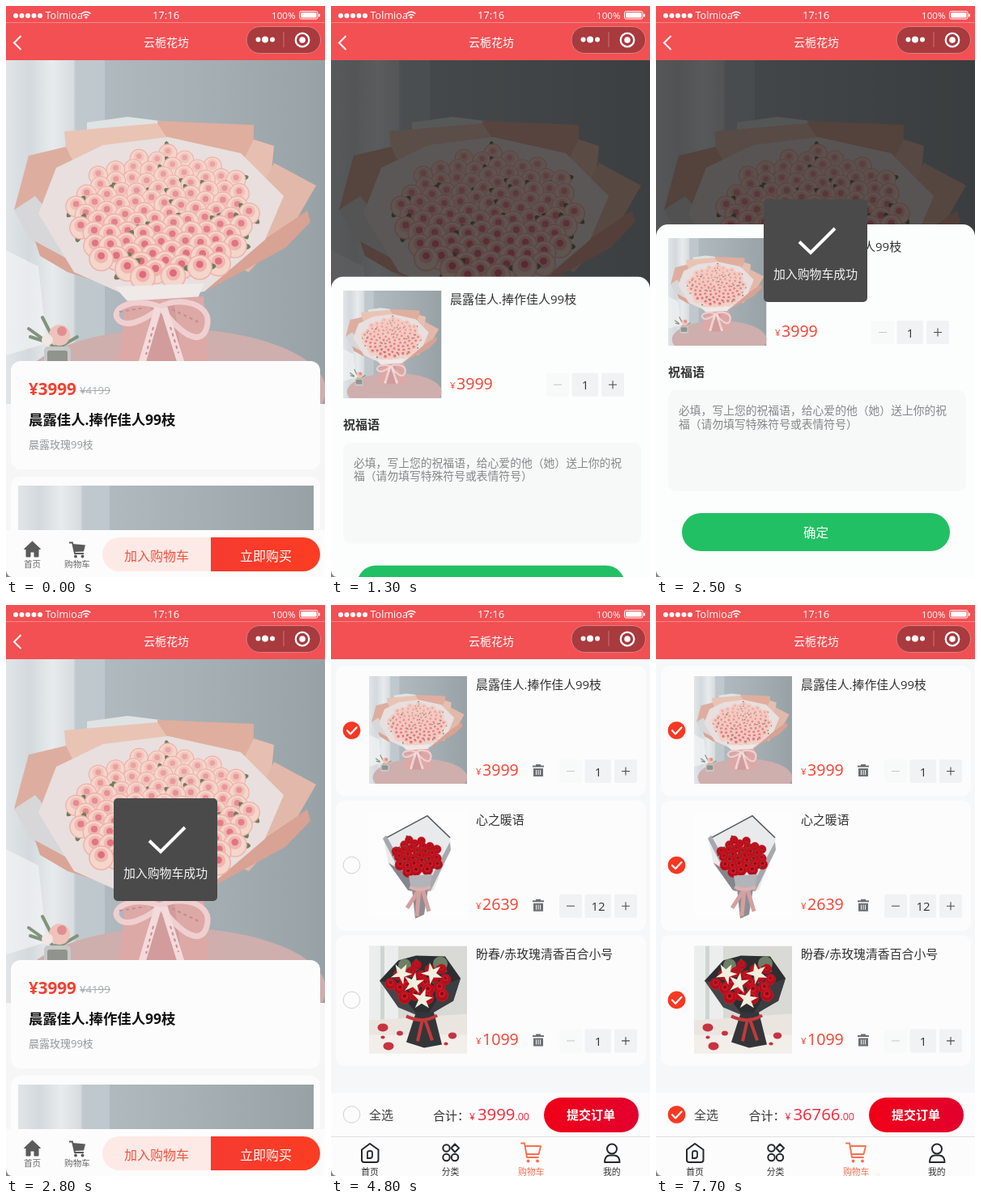
These frames come from a looping animation (394x706 px, 8 s). An HTML page:

```html
<!DOCTYPE html>
<html lang="zh-CN">
<head>
<meta charset="utf-8">
<title>花店</title>
<style>
html, body { margin: 0; width: 100%; height: 100%; overflow: hidden; background: #f6f6f6; }
svg { display: block; width: 100%; height: 100%; }
text { font-family: 'Open Sans', 'Noto Sans CJK SC', 'Noto Sans CJK', sans-serif; white-space: pre; }
</style>
</head>
<body>
<svg id="stage" viewBox="0 0 394 706" preserveAspectRatio="none"></svg>
<script>
const LOOP = 8000;
const RED = '#f6402f';
const PINK_NAME = '晨露佳人.捧作佳人99枝';

// ---- markup helpers
const text = (x, y, size, str, fill, extra = '') =>
  `<text x="${x}" y="${y}" font-size="${size}" fill="${fill}" ${extra}>${str}</text>`;
const mid = (x, y, size, str, fill, extra = '') =>
  text(x, y, size, str, fill, 'text-anchor="middle" ' + extra);
const rect = (x, y, w, h, fill, r = 0, extra = '') =>
  `<rect x="${x}" y="${y}" width="${w}" height="${h}" rx="${r}" fill="${fill}" ${extra}/>`;
const dot = (x, y, r, fill, extra = '') =>
  `<circle cx="${x}" cy="${y}" r="${r}" fill="${fill}" ${extra}/>`;
const poly = (points, fill, extra = '') => `<polygon points="${points}" fill="${fill}" ${extra}/>`;
const line = (d, stroke, w = 1, extra = '') =>
  `<path d="${d}" fill="none" stroke="${stroke}" stroke-width="${w}" ${extra}/>`;
const group = (id, body, extra = '') => `<g id="${id}" ${extra}>${body}</g>`;
const photo = (name, x, y, w, h) => `<use href="#${name}" x="${x}" y="${y}" width="${w}" height="${h}"/>`;
const round = 'stroke-linecap="round" stroke-linejoin="round"';

function random(seed) {
  return () => (seed = (seed * 16807) % 2147483647) / 2147483647;
}

// Spiral of blooms filling an ellipse, painted from back to front
function blooms(n, cx, cy, rx, ry, size, [petal, inner, core, leaf]) {
  const rnd = random(n * 31);
  const spots = Array.from({ length: n }, (_, i) => {
    const r = Math.sqrt((i + 0.5) / n), a = i * 2.39996;
    return [cx + rx * r * Math.cos(a), cy + ry * r * Math.sin(a)];
  }).sort((a, b) => a[1] - b[1]);
  return spots.map(([x, y], i) => {
    const near = i / n, s = size * (0.82 + 0.3 * near), px = x.toFixed(1), py = y.toFixed(1);
    const green = rnd() < 0.3
      ? `<ellipse cx="${px}" cy="${py}" rx="${(s * 1.35).toFixed(1)}" ry="${(s * 0.4).toFixed(1)}" fill="${leaf}" transform="rotate(${Math.round(rnd() * 180)} ${px} ${py})"/>` : '';
    return green + dot(px, py, s.toFixed(1), petal, `stroke="${inner}" stroke-width="${(s * 0.1).toFixed(2)}"`) +
      dot(px, (y - s * 0.2).toFixed(1), (s * 0.58).toFixed(1), inner, `opacity="${(0.45 + 0.45 * near).toFixed(2)}"`) +
      dot(px, (y - s * 0.25).toFixed(1), (s * 0.3).toFixed(1), core, `opacity="${(0.3 + 0.6 * near).toFixed(2)}"`);
  }).join('');
}

// ---- photos
const pinkTones = ['#f4d6cb', '#f0b0aa', '#db6175', '#6f7d5c'];
const redTones = ['#b30d1b', '#d0202b', '#7d0712', '#4a5a3c'];

const pinkPhoto = `<symbol id="pink" viewBox="0 0 394 433" preserveAspectRatio="none">` +
  rect(0, 0, 394, 433, 'url(#wall)') + rect(0, 0, 86, 433, 'url(#curtain)') +
  rect(84, 0, 38, 433, '#c3cdd2', 0, 'opacity=".75"') +
  poly('0,235 40,255 50,350 0,365', '#f3f4f5', 'opacity=".7"') +
  '<ellipse cx="205" cy="408" rx="190" ry="76" fill="#cfaeae"/>' +
  poly('100,77 150,70 190,75 188,120 100,120', '#dfe3e4') +
  poly('187,75 306,80 305,150 190,150', '#dfae9e') +
  poly('72,88 187,78 205,105 190,150 78,150', '#e9c4b5') +
  poly('306,98 331,106 322,200 270,170', '#e6bfb1') +
  poly('28,118 74,107 100,160 70,215 10,185', '#ddae9f') +
  poly('331,127 383,155 360,195 300,262 270,250', '#e2b8aa') +
  poly('372,186 376,200 345,232 250,284 265,258', '#d8a294') +
  poly('10,185 36,168 85,225 160,290 84,262 30,222', '#d7d6d8') +
  poly('36,224 84,250 150,286 76,262 42,242', '#d9a596') +
  poly('62,133 120,105 200,95 290,115 343,168 320,222 245,286 165,298 84,262 40,190', '#e8dfde') +
  blooms(96, 194, 192, 110, 79, 13.5, pinkTones) +
  poly('134,280 245,276 236,296 195,306 150,298', '#efe9e8') +
  poly('147,298 244,292 250,376 140,376', '#dca9a6') +
  poly('180,302 208,302 218,376 170,376', '#cb9596', 'opacity=".6"') +
  line('M190 305 C160 292 128 306 138 320 S178 318 190 305 C212 292 252 300 249 325 S226 352 190 305', '#f0cfd0', 7) +
  line('M188 306 L168 374 M195 306 L216 374', '#f3dadb', 9) +
  line('M140 311 L172 306 M205 308 L240 325 M182 330 L173 364 M203 330 L213 362', '#c98a92', 2, 'stroke-dasharray="4 4"') +
  line('M60 355 L28 332 M64 355 L45 318 M66 355 L88 342 M55 350 L30 342', '#81947c', 4, round) +
  dot(66, 340, 13, '#efc2ba') + dot(69, 335, 6, '#df8f92') + dot(51, 346, 7, '#f1e6e2') +
  rect(47, 354, 33, 30, '#c7c8c8', 5) + rect(51, 359, 25, 18, '#8f958c', 3) + '</symbol>';

const redPhoto = `<symbol id="red" viewBox="0 0 121 133" preserveAspectRatio="none">` +
  rect(0, 0, 121, 133, '#fdfdfd') +
  poly('18,35 72,5 101,32 98,50 80,98 50,98 24,66', '#e9eaec') +
  line('M18 35 L72 6 L100 33', '#55575b', 1.5) +
  poly('17,34 21,30 50,82 78,80 100,38 101,48 76,99 50,99', '#a6a8ad') +
  poly('24,64 50,80 54,98 48,98', '#83868c') +
  blooms(30, 59, 56, 29, 22, 6, redTones) +
  poly('49,80 78,78 75,96 52,97', '#b2b4b9') +
  poly('53,96 73,96 68,128 57,133', '#8d8e92') +
  line('M62 97 L47 120 M66 97 L74 124 M62 97 L59 130', '#d3a09f', 5) +
  line('M50 94 Q62 100 76 94', '#dcb0ad', 4) + '</symbol>';

const lilyPhoto = `<symbol id="lily" viewBox="0 0 121 133" preserveAspectRatio="none">` +
  rect(0, 0, 121, 133, '#d9d9d6') + rect(0, 0, 36, 95, '#eceeed') + rect(14, 0, 5, 95, '#cfd6d2') +
  poly('0,92 121,84 121,133 0,133', '#ebe5e0') + rect(0, 110, 121, 23, '#f2eeea') +
  poly('13,43 36,18 58,12 94,13 113,40 104,68 70,88 38,76', '#2d2e31') +
  poly('13,43 30,47 60,86 36,76', '#44464a') + poly('113,40 96,47 72,86 104,68', '#3b3d40') +
  dot(88, 22, 9, '#6d7f66') + dot(44, 24, 8, '#6d7f66') +
  blooms(19, 63, 46, 38, 25, 7, redTones) +
  [[55, 46, 10], [78, 34, 50], [66, 66, 80], [40, 34, 30]].map(([x, y, a]) =>
    `<path transform="translate(${x} ${y}) rotate(${a})" d="M0 -13 L3 -4 L12 -6 L5 2 L9 11 L0 5 L-9 11 L-5 2 L-12 -6 L-3 -4Z" fill="#f1efdd"/>`).join('') +
  poly('58,82 80,82 90,122 68,126 46,119', '#343538') +
  line('M46 87 Q67 97 84 86 M66 91 L60 118 M69 91 L78 117', '#c2393c', 4) +
  [[17, 101, 5], [24, 124, 5], [38, 108, 3], [103, 111, 4], [17, 113, 2], [95, 121, 2]]
    .map(([x, y, r]) => `<ellipse cx="${x}" cy="${y}" rx="${r * 1.3}" ry="${r}" fill="#c63440"/>`).join('') + '</symbol>';

const grad = (id, stops, extra = '') => `<linearGradient id="${id}" ${extra}>` +
  stops.map((c, i) => `<stop offset="${i / (stops.length - 1)}" stop-color="${c}"/>`).join('') + '</linearGradient>';
const defs = '<defs>' + grad('wall', ['#b9c3c8', '#a9b3b8', '#98a2a6']) +
  grad('curtain', ['#e1e5e8', '#d3d9dd', '#e8ebed', '#d5dade']) +
  grad('buy', ['#f63a30', '#fb3d22']) + grad('submit', ['#f00018', '#e2002d']) +
  pinkPhoto + redPhoto + lilyPhoto + '</defs>';

// ---- shared widgets
const price = (x, y, n) => text(x, y - 1, 11.5, '¥', RED) + text(x + 8, y, 19.6, n, RED);

function stepper(x, y, n) {
  const off = n < 2, cy = y + 14.5;
  return rect(x, y, 28, 29, off ? '#f8f9f9' : '#f1f2f3', 2) + rect(x + 31.5, y, 32.5, 29, '#f1f2f3', 2) +
    rect(x + 68, y, 28, 29, '#f1f2f3', 2) +
    line(`M${x + 9} ${cy}h10`, off ? '#c8c9cc' : '#55575a', 1.1) +
    line(`M${x + 77} ${cy}h10m-5 -5v10`, '#4a4c4f', 1.1) + mid(x + 48, y + 20.5, 15, n, '#333');
}

const tick = (id, y) => dot(25.5, y, 10.3, '#fcfcfd', 'stroke="#cfd1d4"') +
  group(id, dot(25.5, y, 10.8, '#f73822') + line(`M20 ${y + 0.2}l4 4.2l7.5 -8`, '#fff', 2.2, round));

// ---- shop page
const shop = rect(0, 67, 394, 639, '#f6f6f6') + photo('pink', 0, 67, 394, 433) + rect(0, 492, 394, 214, '#f6f6f6') +
  rect(6, 439, 382, 134, '#fcfcfc', 12) +
  text(28, 481, 20.6, '¥3999', RED, 'font-weight="700"') +
  text(91, 480, 13.2, '¥4199', '#a9abad') + line('M91 475.5H129', '#a9abad') +
  text(28, 517.5, 17.4, PINK_NAME, '#111', 'font-weight="700"') +
  text(28, 547, 13, '晨露玫瑰99枝', '#97999b') +
  rect(6, 582, 382, 140, '#fcfcfc', 12) + photo('pink', 15, 593, 365, 401) +
  rect(0, 648, 394, 58, '#fcfcfc') +
  '<path d="M32.5 662L42.5 671.5H40V681H35V675H30V681H25V671.5H22.5Z" fill="#5b5b5b" stroke="#5b5b5b" stroke-linejoin="round"/>' +
  line('M78 663.5H82L85 677H96', '#5b5b5b', 1.8) + poly('82,665 98,666.5 96,674.5 84.5,675', '#5b5b5b') +
  dot(86, 680.5, 1.9, '#5b5b5b') + dot(94.5, 680.5, 1.9, '#5b5b5b') +
  mid(32.5, 694, 10.6, '首页', '#666') + mid(88, 694, 10.6, '购物车', '#666') +
  '<path d="M253.500 657H140A21 21 0 0 0 140 699H253.500Z" fill="#fdeae6"/>' +
  '<path d="M253 657H367A21 21 0 0 1 367 699H253Z" fill="url(#buy)"/>' +
  mid(186, 685.5, 16, '加入购物车', '#f2523f') + mid(321, 685.5, 16, '立即购买', '#fff', 'font-weight="500"');

// ---- bottom sheet, laid out in its open position
const sheet = rect(0, 270, 394, 460, '#fcfdfd', 15) + photo('pink', 15, 287, 121.500, 133) +
  text(147, 303, 15, PINK_NAME, '#333') + price(147, 409, '3999') + stepper(266, 389, 1) +
  text(15, 458, 15, '祝福语', '#333', 'font-weight="700"') + rect(15, 475, 368, 125, '#f7f9f9', 10) +
  text(28, 505, 13.8, '必填，写上您的祝福语，给心爱的他（她）送上你的祝', '#858788') +
  text(28, 521.5, 13.8, '福（请勿填写特殊符号或表情符号）', '#858788') +
  rect(32, 627, 331, 47, '#22c064', 23.5, 'id="ok"') + mid(197.500, 656.5, 15.5, '确定', '#fff');

// ---- cart page
const goods = [
  ['pink', PINK_NAME, '3999', 1],
  ['red', '心之暖语', '2639', 12],
  ['lily', '盼春/赤玫瑰清香百合小号', '1099', 1]
];
const bin = '<path d="M249 198.500H253V197H259V198.500H263V200.500H249ZM250 202H262V212H250Z" fill="#6d7073"/>' +
  line('M253.500 204v6M256 204v6M258.500 204v6', '#fff', 0.9);
const item = ([pic, name, cost, n], i) => group('item' + i,
  rect(6, 75, 383, 161, '#fcfcfd', 11) + tick('tick' + i, 155) + photo(pic, 47, 88, 121, 133) +
  text(179, 104, 14.9, name, '#333') + price(179, 210.5, cost) + bin + stepper(282, 191, n));

const INK = '#26282b', ORANGE = '#f9704f';
const tabs = ['首页', '分类', '购物车', '我的'];
const icons =
  line('M38 673.500L48 666L58.500 673.500V686Q58.500 689 55.500 689H41Q38 689 38 686Z', INK, 2, round) +
  line('M45 684V677Q45 675 48 675T51 677V681Q51 684 48 684Z', INK, 1.8) +
  [[142.500, 671.5], [142.500, 683], [153, 683]].map(([x, y]) => dot(x, y, 4.2, 'none', `stroke="${INK}" stroke-width="2"`)).join('') +
  line('M153 666.500L158 671.500L153 676.500L148.500 671.500Z', INK, 2, round) +
  line('M235 665.500H239L242 683H256M240 669H259L256.500 679H242', ORANGE, 1.9, round) +
  dot(243.5, 687.5, 1.9, ORANGE) + dot(255, 687.5, 1.9, ORANGE) +
  dot(347, 672.5, 6, 'none', `stroke="${INK}" stroke-width="2"`) +
  line('M338 689Q338 681 344 680.500H350Q356.500 681 356.500 689Z', INK, 2, round);

const cart = rect(0, 67, 394, 639, '#f5f7f9') + goods.map(item).join('') +
  rect(0, 603, 394, 103, '#fcfcfd') + tick('tickAll', 630) + text(47, 635.5, 15, '全选', '#444') +
  `<text x="245" y="636.5" text-anchor="end" fill="#f0283a"><tspan font-size="15" fill="#333">合计：</tspan>` +
  `<tspan font-size="12">¥ </tspan><tspan id="sum" font-size="20.300"></tspan><tspan font-size="12.500">.00</tspan></text>` +
  rect(263, 609, 117, 43, 'url(#submit)', 21.5) + mid(321, 636, 15, '提交订单', '#fff', 'font-weight="700"') +
  line('M0 657.500H394', '#dfe0e2') + group('icons', icons) +
  tabs.map((s, i) => mid(48 + i * 99.6, 704.5, 10.8, s, i === 2 ? ORANGE : '#333')).join('') +
  group('size', rect(285, 67, 109, 30, '#f7f9fb', 4) + mid(342, 86.5, 14.3, '375px × 555px', '#7a7c7f'));

// ---- toast and frame of the phone
const spokes = Array.from({ length: 12 }, (_, i) =>
  line('M0 -8.500V-15', '#fff', 2.6, `stroke-linecap="round" opacity="${(0.2 + i * 0.06).toFixed(2)}" transform="rotate(${i * 30})"`)).join('');
const toast = rect(133, 239, 128, 127, '#4a4a4a', 5) +
  group('done', line('M177 291.500L191 305L221 275', '#fff', 4) + mid(197, 336.5, 14.9, '加入购物车成功', '#f4f4f4')) +
  group('spin', spokes);

const header = rect(0, 0, 394, 67, '#f25053') + line('M0 20.500H394', '#f7888a') +
  [0, 1, 2, 3, 4].map(i => dot(12 + i * 7.5, 12, 3, '#fff')).join('') +
  text(48.500, 15.5, 12.6, 'Tolmioa', '#fff', 'id="carrier"') +
  line('M93.500 9.500Q99 5 104.500 9.500M95.500 12Q99 9 102.500 12', '#fff', 1.5) + dot(99, 14, 1.6, '#fff') +
  mid(197.500, 16, 13, '17:16', '#fff') + text(328, 16, 11.6, '100%', '#fff') +
  rect(362.5, 6.5, 22.5, 9.5, 'none', 2, 'stroke="#fff"') + rect(364, 8, 19.5, 6.5, '#fff', 1) + rect(386, 9.5, 1.8, 4, '#fff', 1) +
  mid(198, 50, 14, '云栀花坊', '#fff') +
  rect(297, 25.5, 91.5, 33, '#a93a3e', 16.5, 'stroke="#d98083"') +
  dot(311.5, 41.500, 3, '#fff') + dot(320, 41.5, 4, '#fff') + dot(329, 41.5, 3, '#fff') +
  line('M343 32V51', '#c8777a') + dot(366, 42, 8.3, 'none', 'stroke="#fff" stroke-width="2.300"') + dot(366, 42, 3.8, '#fff') +
  group('back', line('M18.500 37L10 45.500L18.500 54', '#fff', 2));

document.getElementById('stage').innerHTML = defs + group('shop', shop) +
  rect(0, 67, 394, 639, '#000', 0, 'id="dim"') + group('sheet', sheet) + group('cart', cart) + header +
  group('toast', toast) + '<path d="M0 698Q1 705 7 706H0Z" fill="#858585"/>';

// ---- timeline
const $ = id => document.getElementById(id);
const show = (id, on) => $(id).setAttribute('display', on ? 'inline' : 'none');
const during = (t, a, b) => t >= a && t < b;
const clamp = v => Math.min(1, Math.max(0, v));
const easeOut = p => 1 - Math.pow(1 - clamp(p), 2.75);

function render(ms) {
  const t = Math.floor(ms / 100) * 100; // the screen refreshes ten times a second
  const inCart = t >= 3800, loaded = t >= 4000;

  show('shop', !inCart);
  show('back', !inCart);
  show('cart', inCart);

  const open = t < 2500 ? easeOut((t - 1100) / 400) : 1 - easeOut((t - 2500) / 300);
  show('sheet', open > 0);
  $('sheet').setAttribute('transform', `translate(0 ${((1 - open) * 436).toFixed(2)})`);
  $('dim').setAttribute('opacity', 0.62 * clamp(open * 1.15));
  $('ok').setAttribute('fill', during(t, 2200, 2400) ? '#1eab59' : '#22c064');

  const done = during(t, 2400, 3800), spin = during(t, 3900, 4000) || during(t, 6400, 6600);
  show('toast', done || spin);
  show('done', done);
  show('spin', spin);
  $('spin').setAttribute('transform', `translate(197.5 302) rotate(${(t / 100 + 3) % 12 * 30})`);

  const picked = [loaded, t >= 6500, t >= 7600];
  goods.forEach((_, i) => {
    show('item' + i, loaded || i > 0);
    $('item' + i).setAttribute('transform', `translate(0 ${(loaded ? i : i - 1) * 166.7})`);
    show('tick' + i, picked[i]);
  });
  show('tickAll', t >= 7700);
  const paid = [loaded, t >= 6500, t >= 7700];
  $('sum').textContent = goods.reduce((sum, [, , cost, n], i) => sum + (paid[i] ? cost * n : 0), 0);
  show('icons', loaded);
  show('size', during(t, 3800, 4800));
}

const start = performance.now();
function tickFrame() {
  render((performance.now() - start) % LOOP);
  requestAnimationFrame(tickFrame);
}
tickFrame();
</script>
</body>
</html>
```
